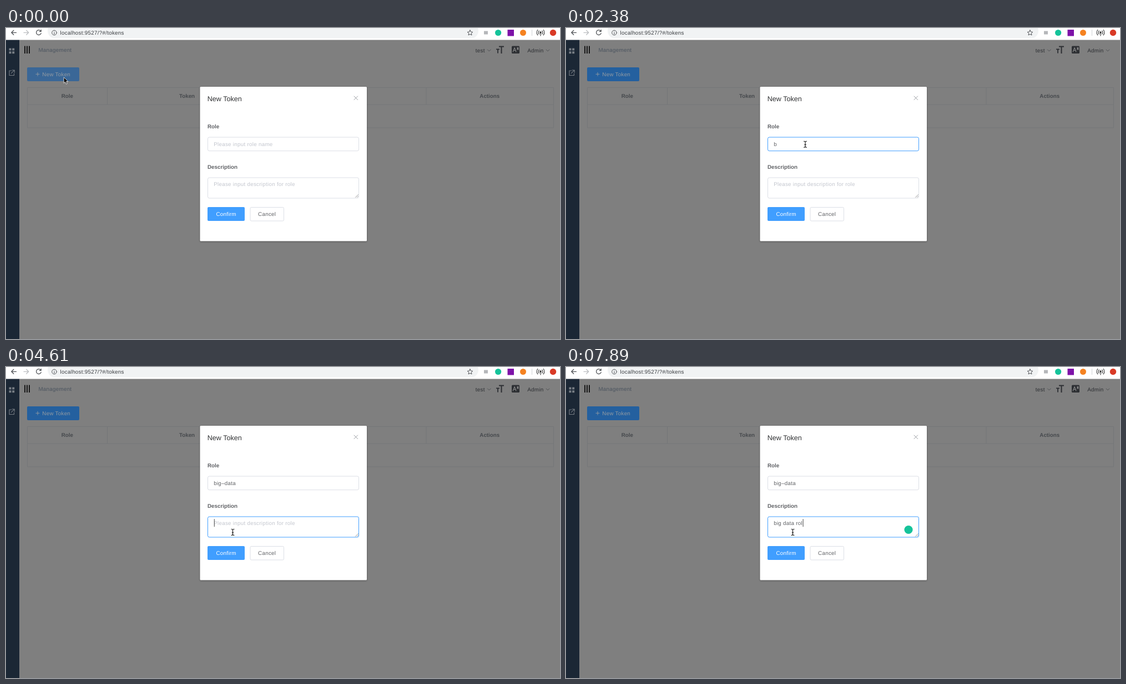
An HTML page that plays this animation: 998 by 561 pixels, repeating every 8 s.

```html
<!DOCTYPE html>
<html lang="en">
<head>
<meta charset="utf-8">
<title>New Token</title>
<style>
  html, body { margin: 0; width: 100%; height: 100%; overflow: hidden; background: #7f7f7f; }
  svg { display: block; width: 998px; height: 561px; }
  text { font: 9.8px "Liberation Sans", Arial, sans-serif; letter-spacing: .28px; text-rendering: geometricPrecision; white-space: pre; }
  .bold { font-weight: bold; letter-spacing: 0; }
  .mid { text-anchor: middle; }
  .line { fill: none; stroke-linecap: round; stroke-linejoin: round; }
  .hint { fill: #c3c6ce; }
  .typed { fill: #606266; }
  .field { fill: #fff; stroke-width: 1; }
</style>
</head>
<body>
<svg viewBox="0 0 998 561">
  <rect width="998" height="561" fill="#7f7f7f"/>

  <!-- sidebar -->
  <rect y="21" width="24" height="540" fill="#1b2735"/>
  <path fill="#777d84" d="M5.5 36.5h4v4h-4zM11.2 36.5h4v4h-4zM5.5 42.2h4v4h-4zM11.2 42.2h4v4h-4z"/>
  <path class="line" stroke="#777d84" stroke-width="1.1" d="M9.5 77H6v8.5h8.5V82M11 76h4.2v4.2M15 76.2l-5.5 5.5"/>

  <!-- browser bar -->
  <rect width="998" height="21.5" fill="#fff"/>
  <rect x="75" y="-8" width="776" height="26.5" rx="13" fill="#f1f3f4"/>
  <g class="line" stroke="#505357" stroke-width="1.3">
    <path d="M18.5 8.3H10M13.8 4.3l-4 4 4 4"/>
    <path stroke="#bcbec1" d="M32 8.3h8.5M36.7 4.3l4 4-4 4"/>
    <path d="M62.3 5.2a4.4 4.4 0 1 0 .9 4.2M63.2 3.3v3h-3"/>
    <circle cx="87" cy="8.5" r="4.3" stroke-width="1"/>
    <path stroke-width="1.1" d="M87 8.3v2.5M87 6.2v.1"/>
    <path stroke-width="1" d="M836 3.8l1.4 3.1 3.4.4-2.5 2.3.7 3.3-3-1.7-3 1.7.7-3.3-2.5-2.3 3.4-.4z"/>
  </g>
  <text x="97.6" y="12" fill="#3a3d41">localhost:9527/?#/tokens</text>
  <rect x="861" y="5.5" width="7" height="6" fill="#b5b7ba"/>
  <circle cx="886.6" cy="8.5" r="5.6" fill="#15c39a"/>
  <rect x="903.5" y="3" width="11.5" height="11.5" fill="#7d12a8"/>
  <circle cx="931.5" cy="8.5" r="5.5" fill="#f58220"/>
  <path stroke="#d0d2d5" d="M947.5 3v11"/>
  <g class="line" stroke="#333" stroke-width="1.1">
    <circle cx="963" cy="8" r="1.2" fill="#333"/>
    <path d="M963 9v5M960.3 5.2a4 4 0 0 0 0 5.8M965.7 5.2a4 4 0 0 1 0 5.8M957.9 3.4a7 7 0 0 0 0 9.4M968.1 3.4a7 7 0 0 1 0 9.4"/>
  </g>
  <circle cx="985.5" cy="8.5" r="5.7" fill="#d93a26"/>

  <!-- page header -->
  <path stroke="#171717" stroke-width="2" d="M34 32.5v13.5M38 32.5v13.5M42 32.5v13.5"/>
  <text x="58.4" y="43" fill="#4b545f">Management</text>
  <g fill="#2d2f33">
    <text x="845.8" y="43.5">test</text>
    <text x="939.3" y="43.5">Admin</text>
    <path d="M888 32.5h9v2h-3.5v11.5h-2V34.5H888zM883 37.5h6v1.8h-2.1v6.2h-1.8v-6.2H883z"/>
    <rect x="911" y="32.5" width="14" height="13.5" rx="1.5"/>
  </g>
  <path class="line" stroke="#8a8a8a" stroke-width="1.1" d="M913.3 43l2.8-7.5 2.8 7.5M914.3 40.5h3.6M920.5 36h3M922 35v1.2M920.8 39.2l2.4-3M921.2 37l2.2 2.2"/>
  <path class="line" stroke="#484a4d" stroke-width=".9" d="M867.5 39l2.8 2.8 2.8-2.8M973.2 39l2.8 2.8 2.8-2.8"/>

  <!-- page body -->
  <rect id="add" x="38" y="71" width="94" height="25" rx="2"/>
  <path stroke="#929aa2" stroke-width=".9" d="M53.5 83.3h7M57 79.8v7"/>
  <text x="65.3" y="87" fill="#929aa2">New Token</text>
  <path fill="none" stroke="#747678" d="M38.5 107.5h948v72.5h-948zM38.5 138h948M182.5 107.5V138M757 107.5V138"/>
  <g class="mid" fill="#46494d">
    <text class="bold" x="110.3" y="126.3">Role</text>
    <text class="bold" x="326" y="126.3">Token</text>
    <text class="bold" x="871.3" y="126.3">Actions</text>
  </g>

  <!-- dialog -->
  <rect x="349.5" y="106" width="300.5" height="278.5" rx="1.5" fill="#fff" style="filter:drop-shadow(0 1px 1.5px rgba(0,0,0,.35))"/>
  <text x="362.7" y="132.3" fill="#303133" style="font-size:12.6px;letter-spacing:0">New Token</text>
  <path class="line" stroke="#909399" stroke-width=".9" d="M627 123l6.6 6.6M633.6 123l-6.6 6.6"/>
  <text class="bold" x="363" y="181" fill="#606266">Role</text>
  <text class="bold" x="363" y="254" fill="#606266">Description</text>
  <rect id="roleBox" class="field" x="363.5" y="197" width="272" height="24.7" rx="2.8"/>
  <rect id="descBox" class="field" x="363.5" y="270" width="272" height="37" rx="2.8"/>
  <path class="line" stroke="#77797c" stroke-width=".7" d="M629.5 305.5l5-5M632.3 305.5l2.2-2.2"/>
  <text id="roleText" x="374.2" y="213"></text>
  <text id="descText" x="374.2" y="284.6"></text>
  <rect id="caret" width=".9" height="14" fill="#333"/>
  <circle id="badge" cx="617" cy="293.5" r="7.6" fill="#15c39a"/>
  <rect x="363" y="323" width="67" height="25" rx="2" fill="#409eff"/>
  <text class="mid" x="396.6" y="339" fill="#fff">Confirm</text>
  <rect x="440" y="323.5" width="60.5" height="24.5" rx="2" fill="#fff" stroke="#dcdfe6"/>
  <text class="mid" x="470.2" y="339" fill="#606266">Cancel</text>

  <!-- pointers, hot spot at 0,0 -->
  <path id="arrow" fill="#000" stroke="#fff" stroke-width=".8" d="M0 0v10.6l2.4-2.2 1.7 3.9 1.9-.8-1.7-3.8h3.3z"/>
  <g id="beam" class="line">
    <path stroke="#fff" stroke-width="2.4" d="M-2.5-5.5Q0-5.5 0-4V4Q0 5.5-2.5 5.5M2.5-5.5Q0-5.5 0-4V4Q0 5.5 2.5 5.5M-1.3.8H1.3"/>
    <path stroke="#111" stroke-width="1.1" d="M-2.5-5.5Q0-5.5 0-4V4Q0 5.5-2.5 5.5M2.5-5.5Q0-5.5 0-4V4Q0 5.5 2.5 5.5M-1.3.8H1.3"/>
  </g>
</svg>
<script>
const LOOP = 8000;
const GREY = '#dcdfe6', HOVER = '#c0c4cc', BLUE = '#409eff';
const $ = id => document.getElementById(id);

const start = {
  add: '#3a6797', roleEdge: GREY, descEdge: GREY, role: '', desc: '',
  caret: '', badge: false, pointer: 'arrow', x: 104.2, y: 88.8
};

// Each step changes only what it names; the rest carries over.
const steps = [
  [600, { x: 126, y: 101 }],
  [750, { x: 236, y: 165 }],
  [890, { x: 366, y: 225 }],
  [1040, { x: 428, y: 232 }],
  [1180, { pointer: 'beam', x: 431, y: 209.7, roleEdge: HOVER }],
  [1480, { add: '#2f6499', roleEdge: '#7cb0e8', caret: 'role' }],
  [1630, { add: '#24609f', roleEdge: BLUE }],
  [1930, { role: 'b' }],
  [2380, { caret: '' }],
  [2530, { role: 'bi', caret: 'role' }],
  [2680, { role: 'big' }],
  [2980, { role: 'big–' }],
  [3130, { role: 'big–d' }],
  [3270, { role: 'big–da' }],
  [3420, { role: 'big–data' }],
  [3720, { pointer: 'arrow', x: 433, y: 238 }],
  [3870, { x: 433.2, y: 261 }],
  [4010, { pointer: 'beam', x: 420, y: 287, descEdge: HOVER }],
  [4160, { x: 408.5, y: 298 }],
  [4460, { roleEdge: '#a5c6ee', descEdge: '#7cb0e8', caret: 'desc' }],
  [4610, { roleEdge: GREY, descEdge: BLUE }],
  [4750, { badge: true }],
  [5050, { caret: '' }],
  [5350, { desc: 'b', caret: 'desc' }],
  [5500, { desc: 'bi' }],
  [5650, { desc: 'big' }],
  [6100, { caret: '' }],
  [6250, { desc: 'big ', caret: 'desc' }],
  [6550, { desc: 'big d' }],
  [6700, { desc: 'big da' }],
  [6840, { desc: 'big dat' }],
  [6990, { desc: 'big data' }],
  [7290, { desc: 'big data ' }],
  [7590, { desc: 'big data r' }],
  [7740, { desc: 'big data ro' }],
  [7890, { desc: 'big data rol' }]
];

function stateAt(time) {
  const passed = steps.filter(([at]) => at <= time).map(([, change]) => change);
  return Object.assign({}, start, ...passed);
}

const show = (node, on) => node.style.display = on ? '' : 'none';

function fill(node, value, hint) {
  node.textContent = value || hint;
  node.setAttribute('class', value ? 'typed' : 'hint');
}

function placeCaret(name, value) {
  const caret = $('caret');
  show(caret, name);
  if (!name) return;
  const width = value ? $(name + 'Text').getComputedTextLength() : 0;
  caret.setAttribute('x', 374.8 + width);
  caret.setAttribute('y', name === 'role' ? 202.3 : 274.2);
}

function draw(s) {
  $('add').setAttribute('fill', s.add);
  $('roleBox').setAttribute('stroke', s.roleEdge);
  $('descBox').setAttribute('stroke', s.descEdge);
  fill($('roleText'), s.role, 'Please input role name');
  fill($('descText'), s.desc, 'Please input description for role');
  placeCaret(s.caret, s[s.caret]);
  show($('badge'), s.badge);
  for (const id of ['arrow', 'beam']) {
    show($(id), s.pointer === id);
    $(id).setAttribute('transform', `translate(${s.x} ${s.y})`);
  }
}

const began = performance.now();
function tick() {
  draw(stateAt((performance.now() - began) % LOOP));
  requestAnimationFrame(tick);
}
tick();
</script>
</body>
</html>
```
